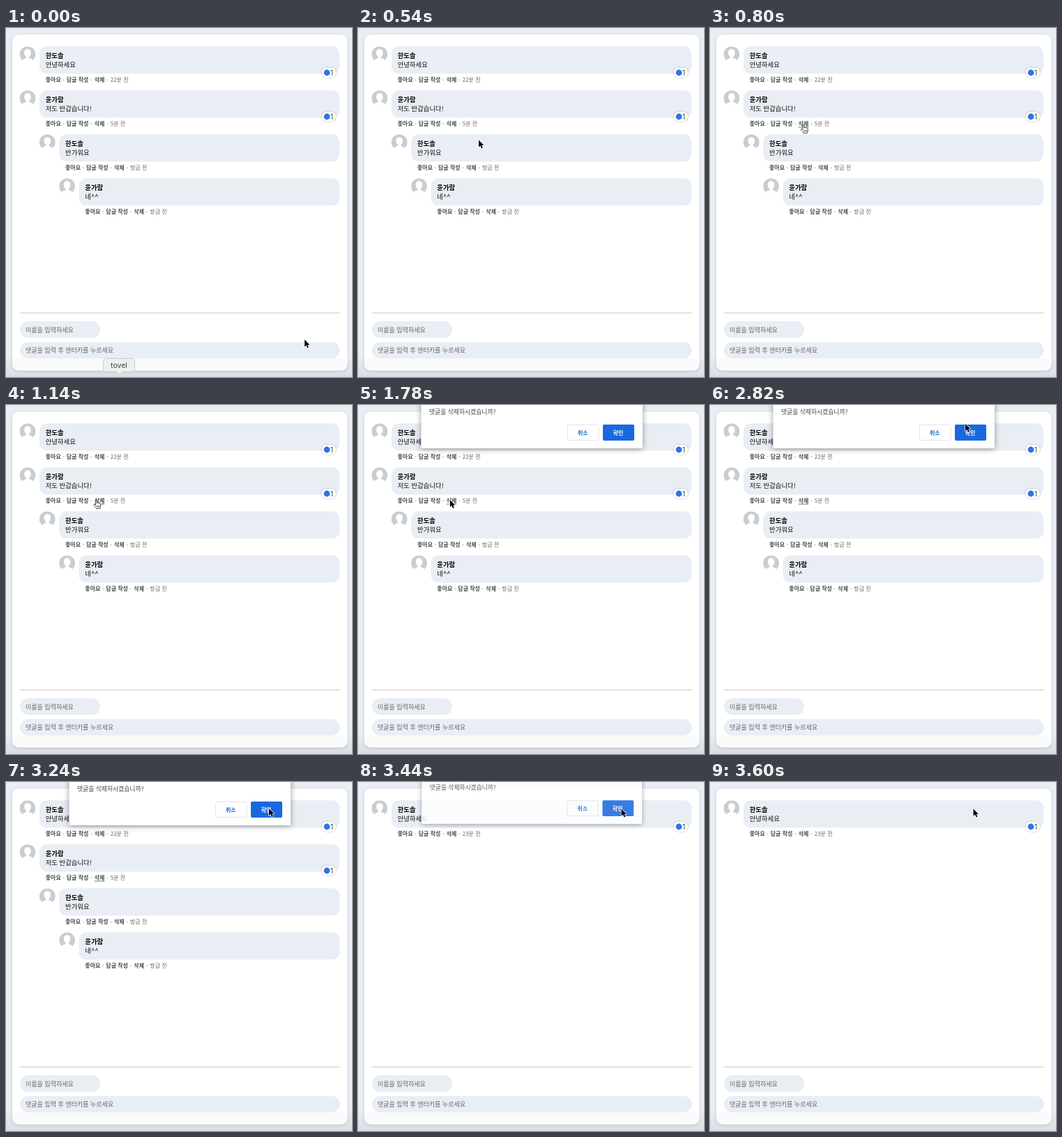
An HTML page for the animation above (5.26 s loop, 496 by 500 pixels).

```html
<!DOCTYPE html>
<html lang="ko">
<head>
<meta charset="utf-8">
<style>
html, body { margin: 0; width: 100%; height: 100%; overflow: hidden; background: #e9eef5; }
svg { display: block; width: 496px; height: 500px; font-family: "Noto Sans CJK KR", "Noto Sans CJK", "Noto Sans CJK JP", sans-serif; }
.name { font-size: 9.4px; font-weight: 700; }
.body { font-size: 9.4px; fill: #111; }
.link { font-size: 8px; font-weight: 700; fill: #4b4d50; }
.time { font-size: 8px; fill: #666; }
.hint { font-size: 9px; fill: #666; }
.ask { font-size: 8.8px; fill: #444; }
.btn { font-size: 8px; font-weight: 700; text-anchor: middle; }
.count { font: 10px Inter, sans-serif; fill: #444; }
.tip { font: 10.5px Inter, sans-serif; fill: #444; text-anchor: middle; }
.card { filter: drop-shadow(0 1px 2px rgba(0,0,0,.15)); }
.pill { filter: drop-shadow(0 .5px 1px rgba(0,0,0,.3)); }
.sheet { filter: drop-shadow(0 1px 4px rgba(0,0,0,.4)); }
#dialog { transform-origin: 249px 0; }
</style>
</head>
<body>
<svg viewBox="0 0 496 500">
  <defs>
    <linearGradient id="shade" x2="0" y2="1">
      <stop stop-opacity="0"/><stop offset="1" stop-opacity=".07"/>
    </linearGradient>
    <clipPath id="round"><circle r="11.5"/></clipPath>
    <g id="avatar" clip-path="url(#round)">
      <circle r="11.5" fill="#c9cdd2"/>
      <path d="M0-7.5C3-7.5 4.8-5.4 4.8-2.2C4.8.4 3.6 2.6 2.2 3.6V5.2C4.4 6.2 7 6.6 7.6 9V12H-7.6V9C-7 6.6-4.4 6.2-2.2 5.2V3.6C-3.6 2.6-4.8.4-4.8-2.2C-4.8-5.4-3-7.5 0-7.5Z" fill="#fff"/>
    </g>
  </defs>
  <rect width="496" height="500" fill="#e9eef5"/>
  <rect y="470" width="496" height="30" fill="url(#shade)"/>
  <rect class="card" x="9" y="9.5" width="480.5" height="481" rx="9" fill="#fff"/>
  <path d="M9 473.5H489.5V481.5A9 9 0 0 1 480.5 490.5H18A9 9 0 0 1 9 481.5Z" fill="#fafafa"/>
  <g id="list"></g>
  <path d="M20 408.2H478.5" stroke="#c6c6c8"/>
  <g fill="#e9eef5">
    <rect x="20" y="420" width="115" height="24" rx="12"/>
    <rect x="20" y="450" width="458.5" height="23.5" rx="11.75"/>
  </g>
  <text class="hint" x="28" y="435.5">이름을 입력하세요</text>
  <text class="hint" x="28" y="465">댓글을 입력 후 엔터키를 누르세요</text>
  <g id="label">
    <path d="M143.5 473.5H180.5Q184.5 473.5 184.5 477.5V488.5Q184.5 492.5 180.5 492.5H167L162 497L157 492.5H143.5Q139.5 492.5 139.5 488.5V477.5Q139.5 473.5 143.5 473.5Z" fill="#eeeff0" stroke="#c9cacc"/>
    <text class="tip" x="162" y="486.5">tovel</text>
  </g>
  <g id="dialog">
    <path class="sheet" d="M90.5-40H408V60.5Q408 62 406.5 62H92Q90.5 62 90.5 60.5Z" fill="#fff"/>
    <text class="ask" x="102" y="13">댓글을 삭제하시겠습니까?</text>
    <rect x="300.5" y="28.5" width="44.5" height="22" rx="2" fill="#fff" stroke="#e3e5e9"/>
    <rect x="351" y="28" width="45" height="23" rx="2" fill="#1a68de"/>
    <text class="btn" x="322.3" y="42.6" fill="#2070d8">취소</text>
    <text class="btn" x="373" y="42.6" fill="#fff">확인</text>
  </g>
  <g id="cursor" stroke-linejoin="round">
    <path id="arrow" d="M0 0V10.2L2.4 8.1L4.1 11.9L5.9 11.1L4.2 7.4H7.4Z" stroke="#fff" stroke-width="1.4" paint-order="stroke"/>
    <path id="hand" d="M-1 .8C-1-.4.8-.4.8.8V4C1.2 3.2 2.6 3.3 2.7 4.3C3.2 3.6 4.4 3.8 4.5 4.8C5 4.3 6.2 4.5 6.2 5.6V8.4C6.2 10 5.2 10.6 5 12H0C-.3 10.4-2 9.2-3.4 7.2C-4.2 6-2.8 5.2-1.9 6.1L-1 7ZM1 7.5V10M2.7 7.5V10M4.4 7.5V10" fill="#fff" stroke="#222" stroke-width=".8"/>
  </g>
</svg>
<script>
const LOOP = 5260, CLICK = 1480, ASK = 1780, REMOVE = 3440;
const $ = id => document.getElementById(id);
const clamp = v => Math.max(0, Math.min(1, v));
const show = (el, on) => el.style.display = on ? '' : 'none';
const text = (cls, x, y, s) => `<text class="${cls}" x="${x}" y="${y}">${s}</text>`;

const comments = [
  ['한도솔', '안녕하세요', '22분 전', 0, true],
  ['윤가람', '저도 반갑습니다!', '5분 전', 0, true],
  ['한도솔', '반가워요', '방금 전', 1],
  ['윤가람', '네^^', '방금 전', 2]
];

function comment([name, body, time, depth, liked], i) {
  const dx = depth * 28.3, x = 56.7 + dx;
  const dots = [26, 65.5, 88.7].map(d => `<circle cx="${x + d}" cy="74.3" r=".65" fill="#777"/>`).join('');
  const badge = liked ? `<rect class="pill" x="452.5" y="57" width="20.5" height="14" rx="7" fill="#fff"/>
    <circle cx="460" cy="64" r="4.4" fill="#2f72e0"/>` + text('count', 465, 67.6, 1) : '';
  return `<g transform="translate(0 ${i * 63})">
    <use href="#avatar" x="${31 + dx}" y="37.7"/>
    <rect x="${48 + dx}" y="26.3" width="${430.3 - dx}" height="39.2" rx="11" fill="#e9eef5"/>
    ${text('name', x, 43, name)}${text('body', x, 55.7, body)}
    ${text('link', x, 77.2, '좋아요')}${text('link', x + 30, 77.2, '답글 작성')}
    ${text('link', x + 70, 77.2, '삭제')}${text('time', x + 93, 77.2, time)}${dots}${badge}</g>`;
}

$('list').innerHTML = comments.map(comment).join('') +
  '<path id="underline" d="M126.8 142H141.3" stroke="#4b4d50" stroke-width=".8"/>';
const removable = [...$('list').children].slice(1, 4);
const age = $('list').querySelector('.time');

// time, x, y of the pointer tip
const path = [
  [0, 428, 446.5], [200, 254, 214], [380, 254, 214], [540, 173, 160.5],
  [700, 140, 141], [920, 127, 136], [1140, 129.5, 136.5], [1320, 132, 136],
  [2160, 132, 136], [2700, 351, 22], [2820, 366, 27], [3240, 377, 38], [3280, 377.5, 38.5]
];

function pointer(t) {
  const i = path.findIndex(p => p[0] > t);
  if (i < 0) return path[path.length - 1].slice(1);
  const [t0, x0, y0] = path[i - 1], [t1, x1, y1] = path[i];
  let k = (t - t0) / (t1 - t0);
  if (t1 === 2700) k = k * k * (3 - 2 * k);
  return [x0 + (x1 - x0) * k, y0 + (y1 - y0) * k];
}

function frame(now) {
  const t = Math.floor(now % LOOP / 20) * 20;
  const [x, y] = pointer(t);
  $('cursor').setAttribute('transform', `translate(${x} ${y})`);
  const hand = t >= 700 && t < CLICK;
  show($('hand'), hand);
  show($('arrow'), !hand);
  show($('underline'), t >= 700 && t < REMOVE);
  $('label').style.opacity = 1 - clamp(t / 200);

  removable.forEach(el => show(el, t < REMOVE));
  age.textContent = t < REMOVE ? '22분 전' : '23분 전';

  const out = clamp((t - REMOVE + 20) / 180);
  show($('dialog'), t >= ASK && out < 1);
  $('dialog').style.opacity = (1 - out) ** 1.4;
  $('dialog').style.transform = `translateY(${-15 * out}px) scale(${1 - .05 * out})`;
  requestAnimationFrame(frame);
}
frame(performance.now());
</script>
</body>
</html>
```
